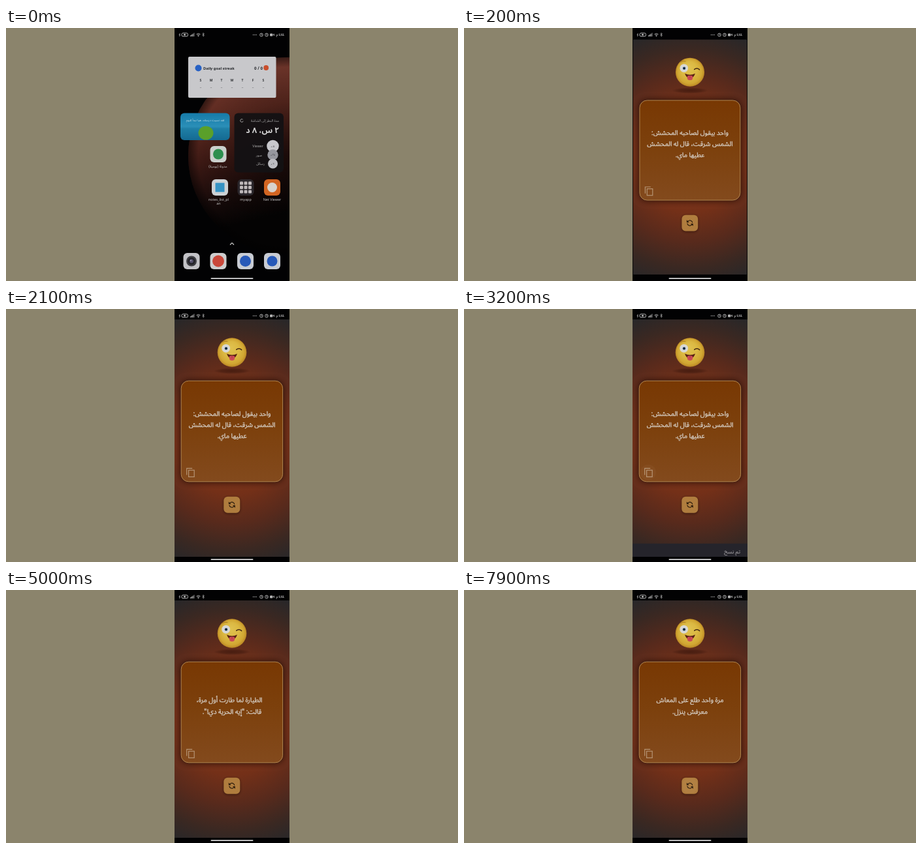
An HTML page with a canvas for the animation above (8000 ms loop, 692 by 388 pixels).

```html
<!DOCTYPE html>
<html lang="ar">
<head>
<meta charset="utf-8">
<title>Joke app</title>
<style>
html, body { margin: 0; width: 100%; height: 100%; overflow: hidden; background: #8b846c; }
canvas { display: block; }
</style>
</head>
<body>
<canvas id="stage" width="692" height="388"></canvas>
<script>
const ctx = document.getElementById('stage').getContext('2d');
const LOOP = 8000;
const FONT = '"Noto Sans Arabic", "Noto Sans", "DejaVu Sans", sans-serif';
const PHONE = { x: 258, w: 176 };

const JOKES = [
  { from: 0, lines: ['واحد بيقول لصاحبه المحشش:', 'الشمس شرقت، قال له المحشش', 'عطيها ماي.'] },
  { from: 4000, lines: ['الطيارة لما طارت أول مرة،', 'قالت: "إيه الحرية دي!".'], shift: -4 },
  { from: 5400, lines: ['مرة واحد راح يشتري ساعة', 'قال له البائع: دي ضد الماء', 'قال: وأنا مع مين؟'] },
  { from: 7700, lines: ['مرة واحد طلع على المعاش', 'معرفش ينزل.'] }
];
const REFRESH_TAPS = [3900, 5350, 7600];
const COPY_TAP = 2900;

const clamp = v => Math.max(0, Math.min(1, v));
const easeOut = v => 1 - (1 - clamp(v)) ** 3;

function box(x, y, w, h, r, fill) {
  ctx.beginPath();
  ctx.roundRect(x, y, w, h, r);
  if (fill) { ctx.fillStyle = fill; ctx.fill(); }
}

function oval(x, y, rx, ry, fill) {
  ctx.beginPath();
  ctx.ellipse(x, y, rx, ry, 0, 0, Math.PI * 2);
  ctx.fillStyle = fill;
  ctx.fill();
}
const disc = (x, y, r, fill) => oval(x, y, r, r, fill);

function line(points, color, width = 1) {
  ctx.beginPath();
  points.forEach(([x, y], i) => i ? ctx.lineTo(x, y) : ctx.moveTo(x, y));
  ctx.strokeStyle = color;
  ctx.lineWidth = width;
  ctx.stroke();
}

function arc(x, y, r, a, b, color, width = 1) {
  ctx.beginPath();
  ctx.arc(x, y, r, a, b);
  ctx.strokeStyle = color;
  ctx.lineWidth = width;
  ctx.stroke();
}

// "heavy" thickens the glyphs without changing their widths.
function label(text, x, y, size, color, { align = 'center', weight = 400, dir = 'ltr', heavy = 0 } = {}) {
  ctx.font = `${weight} ${size}px ${FONT}`;
  ctx.textAlign = align;
  ctx.textBaseline = 'alphabetic';
  ctx.direction = dir;
  ctx.fillStyle = color;
  ctx.fillText(text, x, y);
  if (!heavy) return;
  ctx.strokeStyle = color;
  ctx.lineWidth = heavy;
  ctx.strokeText(text, x, y);
}

function gradient(g, stops) {
  stops.forEach(([at, color]) => g.addColorStop(at, color));
  return g;
}
const linear = (x0, y0, x1, y1, ...stops) => gradient(ctx.createLinearGradient(x0, y0, x1, y1), stops);
const vertical = (y0, y1, ...stops) => linear(0, y0, 0, y1, ...stops);
const radial = (x, y, x1, y1, r, ...stops) => gradient(ctx.createRadialGradient(x, y, 0, x1, y1, r), stops);

function planet(alpha) {
  const x = 430, y = 196, r = 151;
  ctx.save();
  ctx.globalAlpha = alpha;
  disc(x, y, r, linear(345, 60, 400, 290,
    [0, '#6f372c'], [0.3, '#5e2a20'], [0.55, '#3d1914'], [0.8, '#190b0a'], [1, '#040303']));
  disc(x, y, r, radial(x, y, x, y, r, [0, 'rgba(0,0,0,.45)'], [0.6, 'rgba(0,0,0,.15)'], [0.9, 'rgba(0,0,0,0)'], [1, 'rgba(0,0,0,.5)']));
  ctx.restore();
}

function statusBar() {
  const c = '#b4b4b4';
  line([[266.5, 8], [265, 10.5], [266.5, 10.5], [265.5, 13]], c, 0.8);
  box(269, 7.8, 9.5, 5, 2);
  ctx.strokeStyle = c;
  ctx.lineWidth = 1;
  ctx.stroke();
  box(272, 9, 3, 2.6, 1, c);
  for (let i = 0; i < 4; i++) box(282 + i * 1.8, 11.2 - i * 1.2, 1.2, 1.8 + i * 1.2, 0, i < 3 ? c : '#777');
  arc(294.5, 13, 4.4, -2.3, -0.84, c);
  arc(294.5, 13, 2.5, -2.3, -0.84, c);
  disc(294.5, 12.4, 0.8, c);
  line([[300.8, 8.8], [303.4, 11.6], [302, 13], [302, 7.5], [303.4, 9], [300.8, 11.8]], c, 0.7);
  for (let i = 0; i < 3; i++) disc(378.5 + i * 2.3, 10.5, 0.7, c);
  for (const x of [391, 399]) {
    arc(x, 10.5, 2.4, 0, 6.3, c, 0.9);
    line([[x - 0.2, 9], [x, 10.7], [x + 1.4, 10.7]], c, 0.8);
  }
  box(404, 8.6, 4.3, 4, 1, c);
  line([[408.6, 10.6], [410.3, 9.2], [410.3, 12]], c, 1);
  label('٤:٤٤ م', 426, 12.4, 5, c, { align: 'right', dir: 'rtl', heavy: 0.2 });
}

function homePill() {
  box(313.5, 383.2, 65, 1.8, 0.9, '#d8d8d8');
}

function goalCard() {
  box(279, 44, 134.5, 63, 2, '#c8c8cb');
  disc(294.5, 61.5, 5, '#2761c4');
  label('Daily goal streak', 302, 63.6, 5.7, '#25272b', { align: 'left', weight: 600 });
  label('0 / 0', 386.5, 63.6, 6.2, '#25272b', { weight: 600 });
  disc(398.2, 61, 3.9, '#c94e2c');
  [...'SMTWTFS'].forEach((day, i) => {
    const x = 298 + i * 16;
    label(day, x, 82.2, 5, '#303236', { weight: 600 });
    box(x - 1.2, 91, 2.4, 0.8, 0, '#8d8d90');
  });
}

function lessonCard() {
  ctx.save();
  box(267, 130.5, 75.5, 41.5, 6);
  ctx.clip();
  ctx.fillStyle = vertical(130, 172, [0, '#157aa8'], [0.5, '#2b8fb8'], [0.58, '#1f7fa6'], [1, '#146a92']);
  ctx.fillRect(267, 130, 76, 42);
  oval(306, 161, 11.5, 10.5, '#5aa02a');
  ctx.restore();
  label('لقد نسيت درسك، هيا نبدأ اليوم', 305, 142.6, 4.7, '#c7e1e8', { dir: 'rtl' });
}

function screenTimeCard() {
  box(349.5, 130.5, 75.5, 91, 6, 'rgba(19,17,20,.95)');
  arc(361, 142, 2.3, 0.3, 5.5, '#bbb', 0.8);
  label('مدة النظر إلى الشاشة', 418, 144, 5.2, '#aaa', { align: 'right', dir: 'rtl' });
  label('٢ س، ٨ د', 418, 160.8, 12.2, '#d6d6d6', { align: 'right', dir: 'rtl', weight: 700 });
  [['Viewer', 181, 9.3, '#c8c8cc', '٤١ د'], ['صور', 194.5, 8.2, '#96979e', '٢٨ د'], ['رسائل', 208, 7.5, '#bdbdc2', '٢٠ د']]
    .forEach(([name, y, r, color, time]) => {
      disc(408.5, y, r, color);
      label(time, 408.5, y + 1.5, 4, '#303036', { dir: 'rtl' });
      label(name, 394, y + 2, 5.3, '#aaa', { align: 'right' });
    });
}

function appIcon(x, y, back, mark, name = []) {
  box(x - 12.5, y - 12.5, 25, 25, 6, back);
  mark(x, y);
  name.forEach((row, i) => label(row, x + (name.length > 1 ? -2 : 0), y + 20 + i * 6.2, 5.4, '#c4c4c4'));
}
const dot = (r, color) => (x, y) => disc(x, y, r, color);

function keypad(x, y) {
  for (let i = 0; i < 9; i++) box(x - 9 + (i % 3) * 6.5, y - 9 + Math.floor(i / 3) * 6.5, 5, 5, 1.2, '#bfb9bb');
}

function lens(x, y) {
  disc(x, y, 8, '#3e3e43');
  disc(x, y, 5.5, '#222227');
  disc(x, y, 3, '#54506b');
  disc(x - 1, y - 1, 1, '#a8a7ba');
}

function home() {
  planet(1);
  goalCard();
  lessonCard();
  screenTimeCard();
  appIcon(325, 193.5, '#cbd0cc', dot(8, '#2d8f4e'), ['مدونة (يومية)']);
  appIcon(327.5, 244.5, '#cdd2d5', (x, y) => box(x - 7, y - 7, 14, 14, 0, '#3593c4'), ['notes_list_pl', 'an']);
  appIcon(367, 244.5, '#2b272c', keypad, ['myapp']);
  appIcon(407.5, 244.5, '#d36522', dot(7.5, '#d8d2cc'), ['Net Viewer']);
  line([[343, 332.5], [346, 329.5], [349, 332.5]], '#ccc', 1.1);
  appIcon(284, 357.5, '#c2c2c6', lens);
  appIcon(325, 357.5, '#cdcdcd', dot(9, '#c9483a'));
  appIcon(366.5, 357.5, '#c8ccd3', dot(8.5, '#2759b8'));
  appIcon(407.5, 357.5, '#c8ccd3', dot(8, '#2759b8'));
}

function emoji() {
  ctx.save();
  ctx.translate(346, 95);
  ctx.scale(1, 0.17);
  disc(0, 0, 28, radial(0, 0, 0, 0, 28, [0, 'rgba(35,10,5,.45)'], [0.6, 'rgba(35,10,5,.3)'], [1, 'rgba(35,10,5,0)']));
  ctx.restore();

  disc(346, 66.5, 22.3, radial(343, 58, 346, 66.5, 22.5,
    [0, '#e0c250'], [0.55, '#dbb842'], [0.85, '#d1a632'], [1, '#b98524']));
  disc(336.7, 60.3, 6.4, '#d8d8d6');
  disc(337, 60.5, 2.3, '#2f5b86');
  disc(337, 60.5, 1.4, '#151a22');
  ctx.lineCap = 'round';
  arc(356.5, 66, 5.3, -2.35, -0.7, '#3d2210', 1.6);
  line([[331, 51], [335, 49.4], [339, 49.8]], '#a87622', 0.9);
  ctx.lineCap = 'butt';
  ctx.beginPath();
  ctx.moveTo(338, 68.5);
  ctx.quadraticCurveTo(346, 72.5, 354, 68.5);
  ctx.quadraticCurveTo(351.5, 76, 346, 76);
  ctx.quadraticCurveTo(340.5, 76, 338, 68.5);
  ctx.fillStyle = '#5a2214';
  ctx.fill();
  box(341.8, 71.8, 8.4, 7.2, [2, 2, 4, 4], '#cb4a55');
  line([[346, 72.5], [346, 76]], '#a5333f', 0.7);
}

function syncIcon(x, y) {
  const c = '#2c1c0d';
  arc(x, y, 4, -2.6, -0.1, c, 1.2);
  arc(x, y, 4, 0.55, 3.05, c, 1.2);
  for (const s of [1, -1]) {
    ctx.beginPath();
    ctx.moveTo(x - s * 5, y - s * 4.8);
    ctx.lineTo(x - s * 5, y - s * 0.9);
    ctx.lineTo(x - s * 1.2, y - s * 0.9);
    ctx.closePath();
    ctx.fillStyle = c;
    ctx.fill();
  }
}

function ripple(x, y, r, age) {
  if (age < 0 || age > 400) return;
  disc(x, y, r * easeOut(age / 250), `rgba(255,235,205,${0.14 * (1 - age / 400)})`);
}

function card(t) {
  ctx.save();
  ctx.shadowColor = 'rgba(18,5,2,.9)';
  ctx.shadowBlur = 11;
  box(268, 110, 156, 155, 12, '#6a3008');
  ctx.restore();
  box(268.2, 110.2, 155.4, 154.6, 11.5,
    vertical(110, 265, [0, '#783803'], [0.45, '#7c400c'], [1, '#834a1d']));
  ctx.strokeStyle = '#b08651';
  ctx.lineWidth = 1;
  ctx.stroke();

  const { lines, shift = 0 } = JOKES.findLast(j => t >= j.from);
  const top = 180.9 - (lines.length - 1) * 8.6;
  lines.forEach((text, i) =>
    label(text, 346 + (i ? 0 : shift), top + i * 17.2, 10, '#d2c8bd', { dir: 'rtl', weight: 500, heavy: 0.4 }));

  ctx.strokeStyle = '#b59373';
  ctx.lineWidth = 1.2;
  ctx.strokeRect(279.6, 247.2, 8.6, 10.2);
  line([[276.7, 254.5], [276.7, 244.3], [285.2, 244.3]], '#b59373', 1.2);
  ripple(282, 250.5, 12, t - COPY_TAP);
}

function refreshButton(t) {
  ctx.save();
  ctx.shadowColor = 'rgba(20,6,0,.55)';
  ctx.shadowBlur = 4;
  ctx.shadowOffsetY = 1;
  box(333.3, 287.8, 25, 25, 6, '#b07d3e');
  ctx.restore();
  syncIcon(345.8, 300.2);
  REFRESH_TAPS.forEach(tap => ripple(345.8, 300.2, 12, t - tap));
}

function snackbar(t) {
  const shown = easeOut((t - 2900) / 250) * (1 - clamp((t - 3220) / 170));
  if (shown <= 0) return;
  const y = 380 - 20.5 * shown;
  ctx.save();
  ctx.beginPath();
  ctx.rect(PHONE.x, y, PHONE.w, 380 - y);
  ctx.clip();
  ctx.fillStyle = '#25242b';
  ctx.fillRect(PHONE.x, y, PHONE.w, 21);
  label('تم نسخ', 423, y + 15.6, 8.6, '#aaa7aa', { align: 'right', dir: 'rtl' });
  ctx.restore();
}

function app(t) {
  ctx.fillStyle = radial(346, 200, 346, 200, 208,
    [0, '#82361a'], [0.4, '#743018'], [0.62, '#582a1c'], [0.82, '#3a2822'], [1, '#25272a']);
  ctx.fillRect(PHONE.x, 16, PHONE.w, 364);
  emoji();
  card(t);
  refreshButton(t);
  snackbar(t);
}

// The opening window grows in two hard steps.
function openingApp(t) {
  const small = t < 200;
  const scale = small ? 0.833 : t < 300 ? 0.99 : 1;
  if (small) planet(0.2);
  ctx.save();
  if (small) {
    ctx.fillStyle = '#000';
    ctx.fillRect(PHONE.x, 16, 160, 364);
    box(272, 60, 146, 287, 3);
    ctx.clip();
    ctx.globalAlpha = 0.93;
  }
  ctx.translate(small ? 345 : 346, small ? 203 : 187.5);
  ctx.scale(scale, scale);
  ctx.translate(-346, -187.5);
  app(t);
  ctx.restore();
}

function draw(t) {
  ctx.fillStyle = '#8b846c';
  ctx.fillRect(0, 0, 692, 388);
  ctx.save();
  ctx.beginPath();
  ctx.rect(PHONE.x, 0, PHONE.w, 388);
  ctx.clip();
  ctx.fillStyle = '#020203';
  ctx.fillRect(PHONE.x, 0, PHONE.w, 388);
  if (t < 100) home();
  else openingApp(t);
  statusBar();
  homePill();
  ctx.restore();
}

const start = performance.now();
function tick() {
  draw((performance.now() - start) % LOOP);
  requestAnimationFrame(tick);
}
tick();
</script>
</body>
</html>
```
